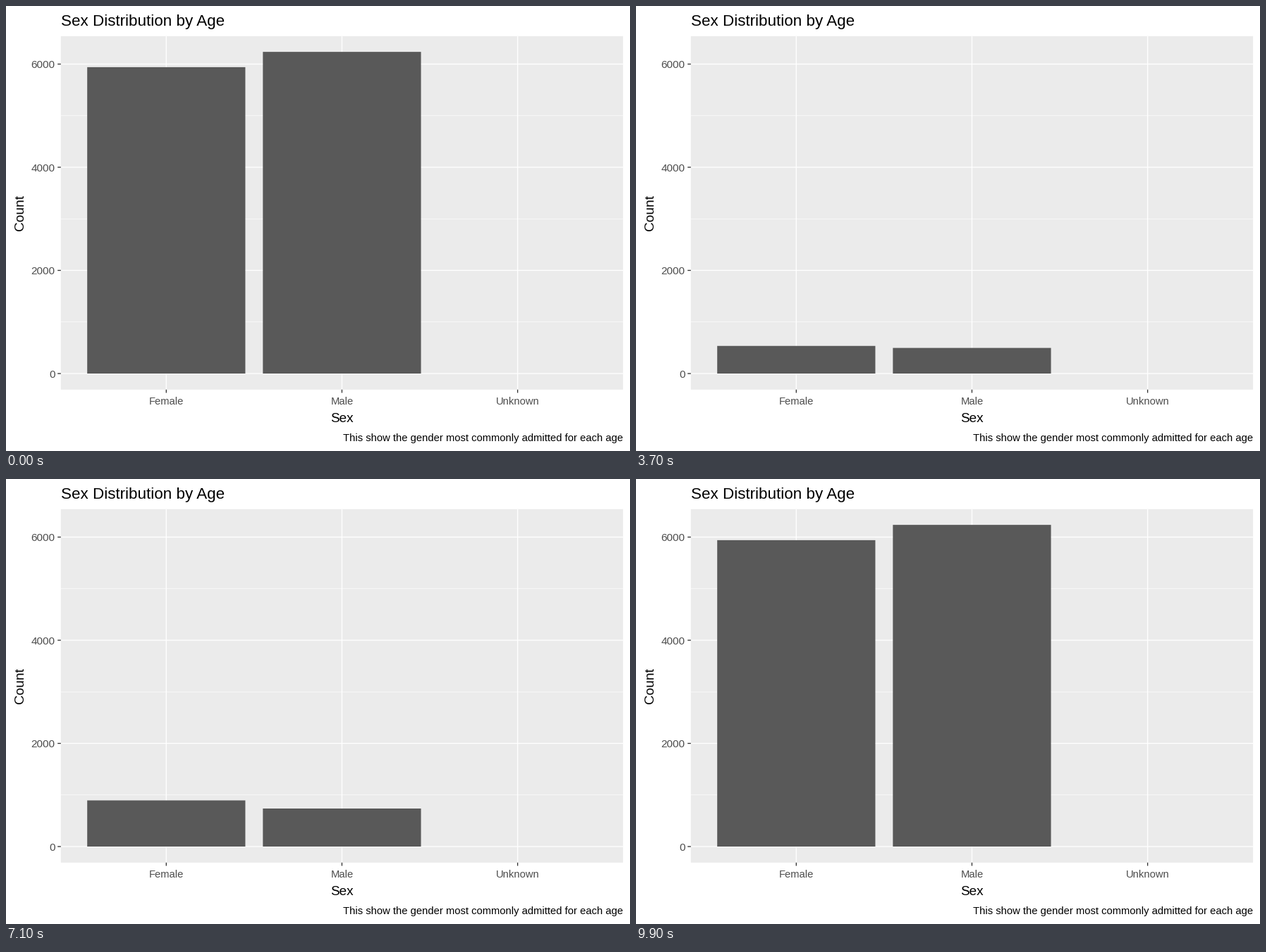
Recreate the animation shown at these times as a matplotlib script. Size 885 by 632 pixels, loop 10000 ms.

```python
import numpy as np
import matplotlib.pyplot as plt
from matplotlib.animation import FuncAnimation
from matplotlib.patches import Rectangle

W, H, DPI = 885, 632, 100
FRAMES = 100
LEFT, RIGHT, TOP, BOTTOM = 77.8, 875.1, 42.8, 544.8
ZERO_Y, PX_PER_COUNT = 522, 0.07325
STEP = (RIGHT - LEFT) / 3.2
CENTERS = [LEFT + STEP * (0.6 + i) for i in range(3)]
BAR_W = 0.9 * STEP

plt.rcParams["font.family"] = "Liberation Sans"
fig = plt.figure(figsize=(W / DPI, H / DPI), dpi=DPI, facecolor="white")
ax = fig.add_axes([0, 0, 1, 1])
ax.set_xlim(0, W)
ax.set_ylim(H, 0)
ax.axis("off")


def rect(x, y, w, h, color, z):
    return ax.add_patch(Rectangle((x, y), w, h, fc=color, lw=0, zorder=z,
                                  snap=False))


def line(xs, ys, color, width=1.33):
    ax.plot(xs, ys, color=color, lw=width * 72 / DPI, zorder=2,
            solid_capstyle="butt", snap=False)


def label(x, y, text, px, color="black", ha="center", **kw):
    ax.text(x, y, text, fontsize=px * 72 / DPI, color=color, ha=ha,
            va="baseline", zorder=5, **kw)


def hump(age, peak, center, width, power=2.0):
    return peak * np.exp(-(abs(age - center) / width) ** power)


def infants(age, births):
    return births * np.exp(-4 * age) + 200 * np.exp(-age / 4)


def elders(age, *shape):
    return max(0, hump(age, *shape) - 120)


def female(age):
    teens, mothers = hump(age, 245, 16, 8), hump(age, 1150, 28, 6.5)
    return infants(age, 5736) + teens + mothers + elders(age, 1220, 60, 23.9, 2.18)


def male(age):
    return infants(age, 6028) + hump(age, 360, 24, 12.5) + elders(age, 1280, 58, 21.6, 1.8)


def unknown(age):
    # a rare handful of cases among teens and adults
    return 3 if 12 < age < 67 and age % 11 == 5 else 0


rect(LEFT, TOP, RIGHT - LEFT, BOTTOM - TOP, "#EBEBEB", 1)
for count in range(0, 6001, 1000):
    y = ZERO_Y - count * PX_PER_COUNT
    major = count % 2000 == 0
    line((LEFT, RIGHT), (y, y), "white", 1.33 if major else 0.67)
    if major:
        line((LEFT - 4.6, LEFT), (y, y), "#333333")
        label(69.5, y + 5.7, str(count), 15.2, "#4D4D4D", "right")
for x, name in zip(CENTERS, ("Female", "Male", "Unknown")):
    line((x, x), (TOP, BOTTOM), "white")
    line((x, x), (BOTTOM, BOTTOM + 4.6), "#333333")
    label(x, 565.5, name, 14.7, "#4D4D4D")

middle = (LEFT + RIGHT) / 2
label(77.5, 28, "Sex Distribution by Age", 22.4, ha="left")
label(middle, 591, "Sex", 18.9)
label(25, 293.5, "Count", 19.2, rotation=90, rotation_mode="anchor")
label(RIGHT, 618, "This show the gender most commonly admitted for each age",
      14.75, ha="right")

bars = [rect(x - BAR_W / 2, ZERO_Y, BAR_W, 0, "#595959", 3) for x in CENTERS]


def draw(frame):
    age = frame % (FRAMES - 1)  # the last frame returns to age zero
    for bar, count in zip(bars, (female, male, unknown)):
        height = count(age) * PX_PER_COUNT
        bar.set_y(ZERO_Y - height)
        bar.set_height(height)
    return bars


anim = FuncAnimation(fig, draw, frames=FRAMES, interval=100,
                     init_func=lambda: draw(0), repeat=True, repeat_delay=0)
plt.show()
```
